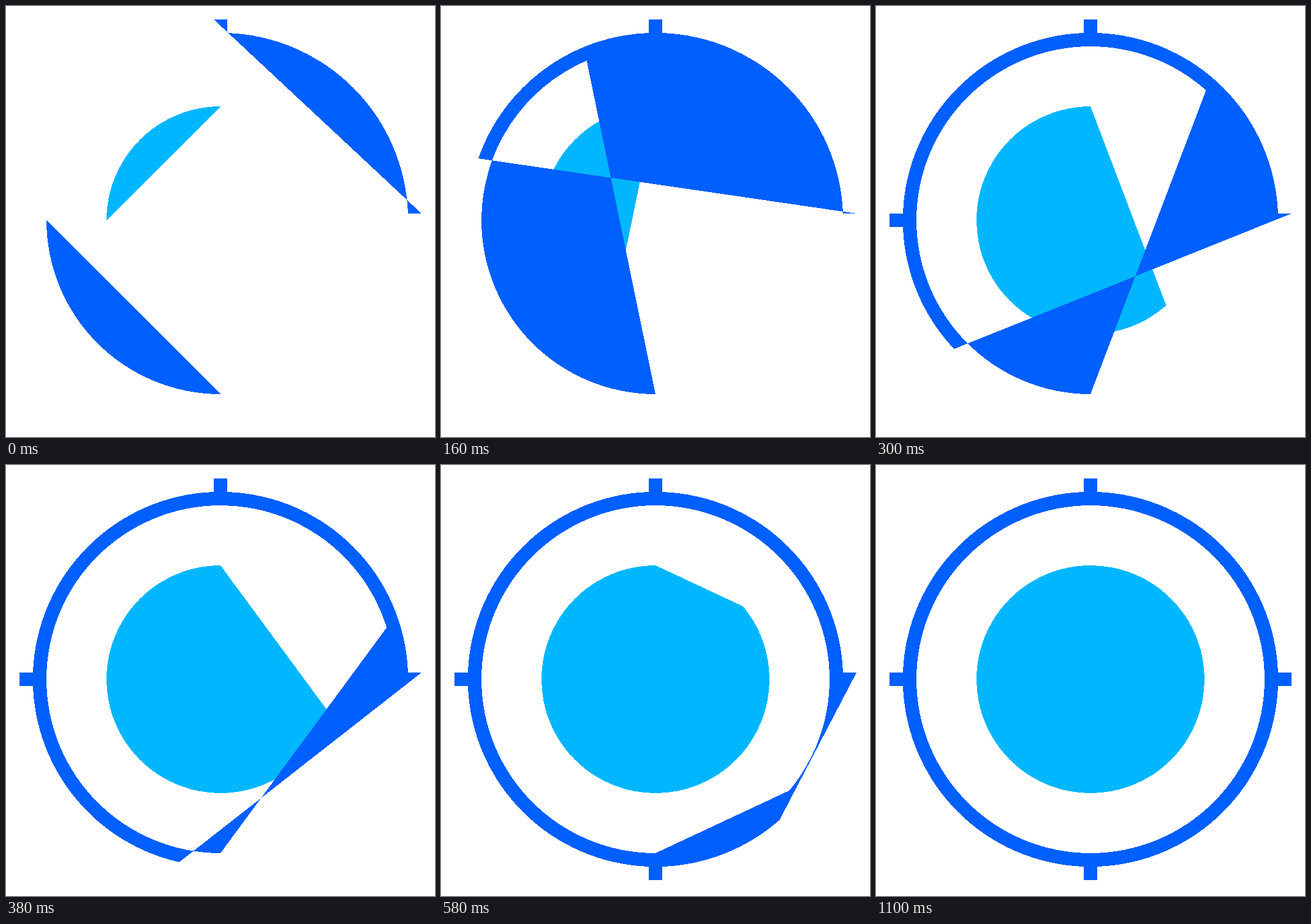
These frames come from a looping animation (700x704 px, 1.6 s). An HTML page:

```html
<!DOCTYPE html>
<html lang="en">
<head>
<meta charset="utf-8">
<title>Target loader</title>
<style>
  html, body { margin: 0; width: 100%; height: 100%; overflow: hidden; background: #fff; }
  svg { display: block; width: 700px; height: 704px; shape-rendering: crispEdges; }
</style>
</head>
<body>
<svg viewBox="0 0 700 704">
  <path id="disc" fill="#00b7ff"/>
  <path id="ring" fill="#005fff" fill-rule="evenodd"/>
</svg>
<script>
const C = 350, QUARTER = Math.PI / 2;
const LOOP = 1600, DRAW = 1100, STEP = 20, FIRST = 0.25;

const polar = (r, a) => [C + r * Math.cos(a), C + r * Math.sin(a)];

// Each segment has a length, a point at share k and a path command to it
function line(a, b) {
  const at = k => [a[0] + (b[0] - a[0]) * k, a[1] + (b[1] - a[1]) * k];
  return { len: Math.hypot(b[0] - a[0], b[1] - a[1]), at, cmd: k => `L${at(k)}` };
}

function arc(r, from, sweep) {
  const at = k => polar(r, from + sweep * k);
  const dir = sweep > 0 ? 1 : 0;
  return { len: r * Math.abs(sweep), at, cmd: k => `A${r} ${r} 0 0 ${dir} ${at(k)}` };
}

function circle(r, from, dir) {
  return [0, 1, 2, 3].map(i => arc(r, from + dir * i * QUARTER, dir * QUARTER));
}

// Circle with a square tick on each side, counter-clockwise from the right tick
function tickedCircle(inner, outer, half) {
  const r = Math.hypot(inner, half), tilt = Math.atan2(half, inner);
  const segs = [];
  for (let i = 0; i < 4; i++) {
    const pt = (x, y) => {
      for (let n = 0; n < i; n++) [x, y] = [y, -x];
      return [C + x, C + y];
    };
    segs.push(
      line(pt(outer, -half), pt(inner, -half)),
      arc(r, -tilt - i * QUARTER, 2 * tilt - QUARTER),
      line(pt(half, -inner), pt(half, -outer)),
      line(pt(half, -outer), pt(-half, -outer))
    );
  }
  return segs;
}

// Closed shape made of the first share p of an outline
function trim(segs, p) {
  let left = p * segs.reduce((sum, s) => sum + s.len, 0);
  let d = `M${segs[0].at(0)}`;
  for (const s of segs) {
    if (left < 1e-6) break;
    d += s.cmd(Math.min(1, left / s.len));
    left -= s.len;
  }
  return d + 'Z';
}

const bez = (a, b, s) => 3 * (1 - s) * (1 - s) * s * a + 3 * (1 - s) * s * s * b + s * s * s;

function ease(x) {
  if (x >= 1) return 1;
  let lo = 0, hi = 1;
  for (let i = 0; i < 30; i++) {
    const mid = (lo + hi) / 2;
    if (bez(0.167, 0.35, mid) < x) lo = mid; else hi = mid;
  }
  return bez(0.167, 1, lo);
}

const outer = tickedCircle(306, 328, 11);
const hole = circle(284, QUARTER, 1);
const dot = circle(186, -QUARTER, -1);
const disc = document.getElementById('disc');
const ring = document.getElementById('ring');

function draw(ms) {
  const t = Math.floor((ms % LOOP + 1) / STEP) * STEP % LOOP;
  const p = FIRST + (1 - FIRST) * ease(t / DRAW);
  disc.setAttribute('d', trim(dot, p));
  ring.setAttribute('d', trim(outer, p) + trim(hole, p));
}

const start = performance.now();
function tick() {
  draw(performance.now() - start);
  requestAnimationFrame(tick);
}
tick();
</script>
</body>
</html>
```
